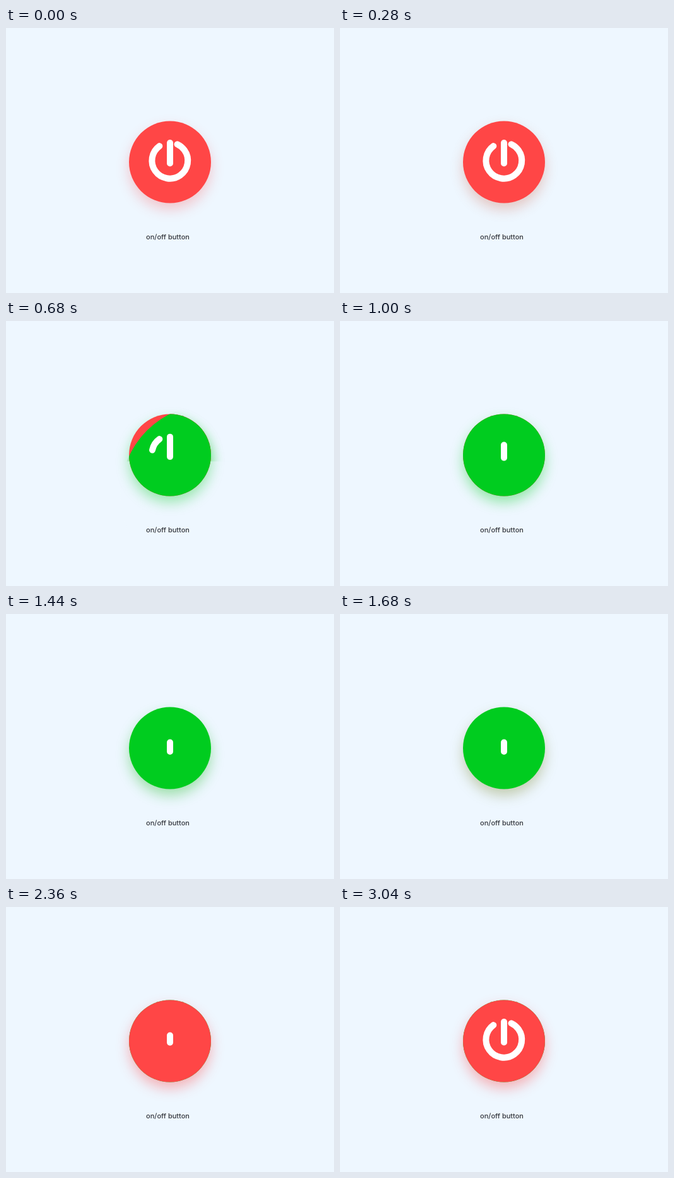
Animation, 520 px wide and 420 px high, one loop 3.12 s. Source, as an HTML page with a canvas:

```html
<!DOCTYPE html>
<html lang="en">
<head>
<meta charset="utf-8">
<title>on/off button</title>
<style>
  html, body { margin: 0; width: 100%; height: 100%; overflow: hidden; background: #eef7ff; }
  canvas { position: absolute; left: 0; top: 0; }
  p {
    position: absolute; left: 156px; top: 324px; width: 201px; margin: 0;
    text-align: center; white-space: nowrap; color: #34373d;
    font: 500 11px/15px Inter, Roboto, sans-serif;
  }
</style>
</head>
<body>
<canvas width="520" height="420"></canvas>
<p>on/off button</p>
<script>
const ctx = document.querySelector('canvas').getContext('2d');
const LOOP = 3120, STEP = 40;
const BG = '#eef7ff';
const RED = [255, 70, 70], GREEN = [0, 204, 31];
const DISC = { x: 260, y: 212.5, r: 65 };
const ORIGIN = { x: 325, y: 275 };
const RING = { x: 259.8, y: 210.2, r: 28.4, from: -2.19, sweep: 5.24 };

// Tables of [time, value]
const ripple = [[0, 0], [40, 80], [120, 126], [200, 143.5], [280, 157], [400, 185]];
const tint = [[-320, 0], [0, 0.5], [40, 0.9], [120, 1]];
const barTop = [[560, 182], [1270, 203.5], [2340, 203.5], [3030, 182]];
const barEnd = [[560, 214.5], [1270, 218], [1880, 218], [2400, 214.5]];
const ringShown = [[520, 1], [730, 0], [2400, 0], [2840, 1]];
const shadowDepth = [[160, 0.27], [520, 0.38]];

const linear = p => p;
const smooth = p => p * p * (3 - 2 * p);

function sample(table, t, ease = linear) {
  if (t <= table[0][0]) return table[0][1];
  for (let i = 1; i < table.length; i++) {
    const [t0, a] = table[i - 1], [t1, b] = table[i];
    if (t <= t1) return a + (b - a) * ease((t - t0) / (t1 - t0));
  }
  return table[table.length - 1][1];
}

const rgba = (c, a = 1) => `rgba(${c.map(Math.round).join()},${a})`;
const blend = (a, b, p) => a.map((v, i) => v + (b[i] - v) * p);

function circle(c, r = c.r) {
  ctx.beginPath();
  ctx.arc(c.x, c.y, r, 0, Math.PI * 2);
}

function disc(color, shadow, alpha) {
  ctx.save();
  ctx.shadowColor = rgba(shadow, alpha);
  ctx.shadowBlur = 20;
  ctx.shadowOffsetY = 10;
  ctx.fillStyle = rgba(color);
  circle(DISC);
  ctx.fill();
  ctx.restore();
}

function button(t) {
  const first = t < 1280;
  const u = t - (first ? 480 : 1681);
  const [from, to] = first ? [RED, GREEN] : [GREEN, RED];
  const shadow = blend(from, to, sample(tint, u));
  const depth = sample(shadowDepth, t);
  disc(from, shadow, depth);

  const r = sample(ripple, u);
  if (!r) return;
  ctx.save();
  circle(ORIGIN, r);
  ctx.clip();
  // The spreading layer starts with a fainter shadow
  if (first && u < 240) {
    ctx.fillStyle = BG;
    ctx.fillRect(DISC.x - 100, DISC.y + 10, 200, 120);
    disc(from, shadow, sample([[40, 0.27], [240, depth]], u));
  }
  ctx.fillStyle = rgba(to);
  circle(DISC);
  ctx.fill();
  ctx.restore();
}

function icon(t) {
  ctx.strokeStyle = '#fff';
  ctx.lineWidth = 10;
  ctx.lineCap = 'round';
  const shown = sample(ringShown, t, smooth);
  if (shown > 0) {
    ctx.beginPath();
    ctx.arc(RING.x, RING.y, RING.r, RING.from, RING.from - RING.sweep * shown, true);
    ctx.stroke();
  }
  ctx.beginPath();
  ctx.moveTo(260, sample(barTop, t, smooth));
  ctx.lineTo(260, sample(barEnd, t));
  ctx.stroke();
}

function draw(now) {
  const t = Math.floor((now % LOOP) / STEP) * STEP;
  ctx.fillStyle = BG;
  ctx.fillRect(0, 0, 520, 420);
  button(t);
  icon(t);
}

const start = performance.now();
function tick() {
  draw(performance.now() - start);
  requestAnimationFrame(tick);
}
tick();
</script>
</body>
</html>
```
